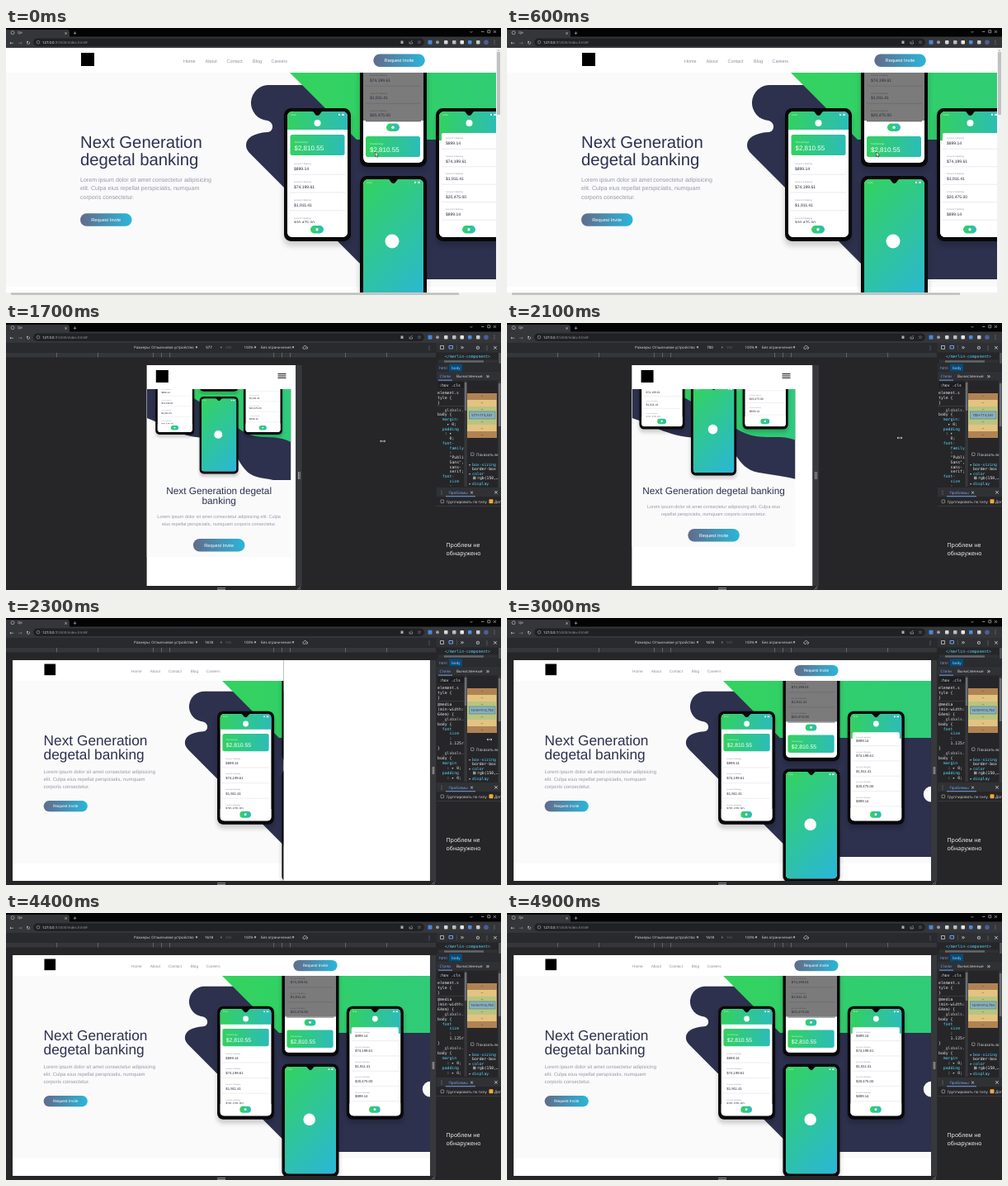
An HTML page for the animation above (5 s loop, 600x323 px).

```html
<!DOCTYPE html>
<html lang="en">
<head>
<meta charset="utf-8">
<title>Banking page</title>
<style>
html, body { margin: 0; width: 100%; height: 100%; overflow: hidden; background: #202124; }
#stage { display: block; width: 100%; height: 100%; }
text { font-family: "Liberation Sans", Arial, sans-serif; text-rendering: geometricPrecision; white-space: pre; }
.ui { font-family: "Open Sans", "Noto Sans", sans-serif; }
.mono { font-family: "DejaVu Sans Mono", monospace; }
.sym { font-family: "DejaVu Sans", sans-serif; text-anchor: middle; }
.mid { text-anchor: middle; }
</style>
</head>
<body>
<svg id="stage" viewBox="0 0 600 323">
  <defs>
    <linearGradient id="brand" gradientUnits="userSpaceOnUse" x1="-16" y1="24" x2="97" y2="136"><stop stop-color="#33d35e"/><stop offset="1" stop-color="#2ab6d9"/></linearGradient>
    <linearGradient id="head"><stop stop-color="#33d160"/><stop offset="1" stop-color="#2cbcb8"/></linearGradient>
    <linearGradient id="btn"><stop stop-color="#626b8b"/><stop offset="1" stop-color="#2ab6d9"/></linearGradient>
    <linearGradient id="wedge"><stop stop-color="#33d35e"/><stop offset="1" stop-color="#2fca7c"/></linearGradient>
    <clipPath id="screen"><rect x="4" y="4" width="73" height="152" rx="6"/></clipPath>
    <filter id="soft" x="-30%" y="-20%" width="160%" height="140%"><feGaussianBlur stdDeviation="3"/></filter>
  </defs>
  <g id="view"></g>
</svg>
<script>
const NAVY = '#2d314e', DARK = '#262628', LOOP = 5000, PX = 0.3127;
const view = document.getElementById('view');

const rect = (x, y, w, h, fill, r = 0, more = '') =>
  `<rect x="${x}" y="${y}" width="${w}" height="${h}" fill="${fill}" rx="${r}" ${more}/>`;
const text = (x, y, size, s, fill, cls = '') =>
  `<text x="${x}" y="${y}" font-size="${size}" fill="${fill}" class="${cls}">${s.replace(/</g, '&lt;')}</text>`;
const dot = (x, y, r, fill, more = '') => `<circle cx="${x}" cy="${y}" r="${r}" fill="${fill}" ${more}/>`;
const path = (d, fill, stroke = 'none', w = 0.7) =>
  `<path d="${d}" fill="${fill}" stroke="${stroke}" stroke-width="${w}"/>`;
const clip = (x, y, w, h, body) =>
  `<svg x="${x}" y="${y}" width="${w}" height="${h}" viewBox="${x} ${y} ${w} ${h}">${body}</svg>`;
const button = (x, y) => rect(x, y, 62.5, 15.5, 'url(#btn)', 7.8) +
  text(x + 31.2, y + 9.7, 5.6, 'Request Invite', '#fff', 'mid');

// Value at time t along [time, value] keys
function at(t, keys) {
  for (let i = 1; i < keys.length; i++) {
    const [t0, a] = keys[i - 1], [t1, b] = keys[i];
    if (t < t1) return a + (b - a) * Math.max(0, (t - t0) / (t1 - t0));
  }
  return keys[keys.length - 1][1];
}

// Phones
const rows = (list, y, step, line = '#eeeff2', small = '#8b8d99') => list.map(([n, sum], i) => {
  const b = y + i * step;
  return text(12, b - 6.6, 2.5, `Account ${n} Banking`, small) +
    text(12, b, 5, sum, '#26283c') + rect(7, b + 4.6, 67, 1.3, line);
}).join('');
const card = (x, y) => rect(x, y, 66, 25, 'url(#head)', 2.5) +
  text(x + 5, y + 10, 2.6, 'Total Earnings', '#e8fff4') + text(x + 5, y + 19, 8, '$2,810.55', '#fff');
const pill = y => rect(32, y, 16, 9.5, 'url(#head)', 4.7) + dot(40, y + 4.7, 1.7, '#fff');
const status = () => text(8, 9, 2.6, '12:30', '#fff') + rect(66, 6.8, 2, 2, '#fff') + rect(70, 6.8, 3, 2, '#fff');
const phone = (x, y, body) => `<g transform="translate(${x} ${y})">` +
  rect(-1, 5, 83, 162, '#000', 9, 'opacity=".16" filter="url(#soft)"') +
  rect(0, 0, 81, 161, '#08080a', 8.5) +
  `<g clip-path="url(#screen)">${rect(4, 4, 73, 152, '#fff')}${body}</g>` +
  path('M32 3.5q4 0 5 3q3.5 5 7 0q1-3 5-3z', '#08080a') + '</g>';

const sums = [[1, '$899.14'], [2, '$74,199.61'], [3, '$1,911.41'], [4, '$20,475.00'], [5, '$899.14']];
const phones =
  phone(337, 97, rect(4, 4, 73, 22, 'url(#head)') + status() + dot(40.5, 18, 4, '#fff') + card(7.5, 32) +
    rows(sums.slice(0, 4), 75, 21.8) + rect(4, 139, 73, 17, '#fff') + pill(142)) +
  phone(429, 7, rect(4, 4, 73, 101, '#7b7b7b') + rows(sums.slice(1, 4), 58, 21.2, '#707070', '#4c4c52') +
    pill(108.5) + card(7, 124)) +
  phone(521, 97, rect(4, 4, 73, 35, 'url(#head)') + status() + dot(40.5, 18, 4, '#fff') +
    rect(7, 30, 67, 30, '#fff', 2) + rows(sums, 44, 21.5) + rect(4, 138, 73, 18, '#fff') + pill(142)) +
  phone(429, 179, rect(4, 4, 73, 152, 'url(#brand)') + status() + dot(39, 79, 8.5, '#fff'));

// Wide layout of the page
const wide =
  rect(0, 24, 700, 330, '#fff') + rect(0, 54, 700, 259, '#fafafb') +
  path('M375 69H320a21.5 21.5 0 0 0-3 43c8 2 8 13 0 14C300 127 291 133 291 142q0 5 5 10L448 304H680V69Z', NAVY) +
  path('M344 54H680V135H425Z', 'url(#wedge)') + dot(640, 215, 11, '#fafafb') + phones +
  rect(0, 24, 700, 30, '#fff') + rect(91, 30, 16, 16, '#000') +
  [[215, 'Home'], [241.5, 'About'], [267.5, 'Contact'], [299, 'Blog'], [321.5, 'Careers']]
    .map(([x, s]) => text(x, 41.7, 5.5, s, '#8d8f9b')).join('') +
  button(445.3, 31.6) +
  text(90, 145.2, 20.3, 'Next Generation', NAVY) + text(90, 166, 20.3, 'degetal banking', NAVY) +
  ['Lorem ipsum dolor sit amet consectetur adipisicing', 'elit. Culpa eius repellat perspiciatis, numquam',
   'corporis consectetur.'].map((s, i) => text(90, 185.7 + i * 10.5, 7.08, s, '#9698a6')).join('') +
  button(90, 224.2);

// Narrow layout: left edge l, width w
function narrow(l, w) {
  const cx = l + w / 2, r = l + w, grow = w - 169, s = 0.556 + grow * 0.0043;
  const one = w > 180, up = one ? 12 : 0, rise = grow / 4;
  const title = one ? ['Next Generation degetal banking'] : ['Next Generation degetal', 'banking'];
  const body = one
    ? ['Lorem ipsum dolor sit amet consectetur adipisicing elit. Culpa eius', 'repellat perspiciatis, numquam corporis consectetur.']
    : ['Lorem ipsum dolor sit amet consectetur adipisicing elit. Culpa', 'eius repellat perspiciatis, numquam corporis consectetur.'];
  const p = (u, y) => `${l + u * w} ${y} `;
  const wave = 'M' + p(0, 80) + 'L' + p(0, 115) + 'C' + p(0.12, 122) + p(0.2, 137) + p(0.4, 139) +
    'C' + p(0.66, 142 - rise) + p(0.6, 181 - rise) + p(0.77, 188 - rise) +
    'C' + p(0.85, 191 - rise) + p(0.95, 193 - rise) + p(1, 196 - rise) + 'V80Z';
  const leaf = 'M' + p(0.225, 80) + 'L' + p(1, 80) + 'L' + p(1, 145 - rise / 2) +
    'C' + p(0.9, 134) + p(0.8, 142) + p(0.7, 134) + 'S' + p(0.6, 118) + p(0.5, 110) + 'Z';
  const hero = path(wave, NAVY) + path(leaf, 'url(#wedge)') +
    `<g transform="translate(${cx - 469.5 * s} ${-7 - grow * 1.38}) scale(${s})">${phones}</g>`;
  return rect(l, 51, w, 267, '#fff') + rect(l, 80, w, 203 - up, '#fafafb') +
    clip(l, 80, w, 110, hero) + rect(l + 11, 57, 15, 15, '#000') +
    [61, 63.4, 65.8].map(y => rect(r - 16, y, 10, 1.1, '#222')).join('') +
    title.map((t, i) => text(cx, 206.7 + i * 12, 11.8, t, NAVY, 'mid')).join('') +
    body.map((t, i) => text(cx, 236.2 - up + i * 8.6, 5.5, t, '#9698a6', 'mid')).join('') +
    button(cx - 31.2, 261 - up);
}

// Browser frame
const icon = (x, y, s, size = 6, fill = '#dcdee1') => text(x, y, size, s, fill, 'sym');
const browser =
  rect(0, 0, 600, 24, '#040405') + path('M0 11V2H74q3 0 3 3V11Z', '#35363a') + rect(0, 10.5, 600, 13.5, '#35363a') +
  dot(8, 5.7, 2, 'none', 'stroke="#b8babd" stroke-width=".7"') + text(14, 7.3, 4.3, 'Qe', '#e2e3e5', 'ui') +
  icon(72.5, 7.5, '×', 5) + icon(83.5, 8, '+', 6) +
  path('M562.5 4l1.5 1.5l1.5-1.5M576 4.5h3.5M583.8 2.8h3v3h-3zM591 3l3 3m0-3l-3 3', 'none', '#d5d6d8', 0.6) +
  icon(7, 19.5, '←') + icon(17, 19.5, '→', 6, '#85878b') + icon(27, 19.5, '↻') +
  rect(33, 12.5, 474, 9.5, '#202124', 4.7) + dot(39, 17.2, 1.8, 'none', 'stroke="#a7a9ad" stroke-width=".6"') +
  '<text x="44" y="18.8" font-size="4.3" fill="#fff" class="ui">127.0.0.1<tspan fill="#979a9f">:5500/index.html#</tspan></text>' +
  rect(478.5, 15.5, 3, 3.5, '#a7a9ad') + path('M489 16.5v2.5h3.5v-2M490 17.5l2.5-2.5', 'none', '#a7a9ad') + icon(501, 19.3, '☆', 6) +
  rect(511.5, 14.8, 5, 5, '#4a86d8', 0.8) + dot(523, 17.3, 2, '#97999d') + rect(531, 15, 4.5, 4.5, '#d5d6d8', 1) +
  rect(541, 15, 4.5, 4.5, '#b9bbbe', 1) + rect(550.5, 15, 4.5, 4.5, '#e8e8e8', 1) +
  rect(560, 15, 4.5, 4.5, '#4c8be0', 1) + rect(570, 15, 4.5, 4.5, '#c8cacd', 1) +
  dot(582, 17.2, 2.8, '#4a5f96') + icon(592, 19.4, '⋮');

const arrow = (x, y) => path(`M${x} ${y}v5.5l1.3-1.2l1 2.2l1-.5l-1-2h1.7Z`, '#fff', '#111', 0.5);
const resize = (x, y) => path(`M${x - 3} ${y}h6M${x - 1.8} ${y - 1.2}l-1.2 1.2l1.2 1.2M${x + 1.8} ${y - 1.2}l1.2 1.2l-1.2 1.2`, 'none', '#eee', 0.7);

const fullWindow = clip(0, 24, 594, 296, wide) +
  rect(594, 24, 6, 299, '#f1f1f1') + rect(595, 29, 4, 76, '#c1c1c1') + icon(597, 27.5, '▴', 3, '#777') +
  rect(0, 320, 594, 3, '#f1f1f1') + rect(6, 320.5, 543, 2.2, '#b9b9b9') + arrow(447.5, 150);

// Developer tools
const GREY = '#dcdee1', BLUE = '#7cacf8', CYAN = '#5cd5fb';
const mono = (x, y, s, fill = '#eceef0') => text(x, y, 4.8, s, fill, 'mono');
const lines = (list, y, step) => list.map((s, i) => {
  const [, pad, word] = s.match(/^( *)(.*)$/);
  const fill = word[0] === '_' ? '#b4b6ba' : /^(margin|padding|font|family|size)/.test(word) ? CYAN : '#e3e4e7';
  return mono(523 + pad.length * 2.9, y + i * step, word, fill);
}).join('');
const ruleTop = ['element.s', 'tyle {', '}'];
const narrowRules = ['  _globals.', 'body {', '  margin:', '    ▸ 0;', '  padding', '   : ▸', '     0;', '  font-', '     family', '     :', '     "Publi', '     Sans",', '     sans-', '     serif;', '  font-', '     size', '     :'];
const wideRules = ['@media', '(min-width:', '64em) {', '  _globals.', 'body {', '  font', '     size', '     :', '     1.125r', '}', '  _globals.', 'body {', '  margin', '    : ▸ 0;', '  padding', '    : ▸ 0;'];

function panel(w, big) {
  const box = big ? `${w}×914,750` : `${w}×715,531`;
  return rect(521.5, 24, 78.5, 299, DARK) + rect(521.5, 24, 78.5, 11.5, '#2f3034') +
    path('M526.5 27.5h4v4h-4z', 'none', GREY) + path('M537 27.5h4.5v3.5h-4.5z', 'none', BLUE, 0.9) + rect(546, 26.5, 0.6, 6, '#55575b') +
    icon(553, 31.7, '»', 8) + icon(572, 31.7, '⚙') + icon(583, 31.7, '⋮') + icon(593, 31.7, '×', 7) +
    clip(522, 36, 75, 8, mono(532, 41.7, '</merlin-component>', CYAN)) +
    rect(524, 44.5, 72, 4, '#303135') + rect(531, 45.3, 48, 2.4, '#66686c') + rect(597, 36, 3, 13, '#515357') +
    rect(522, 49, 78, 9.5, '#2b2c30') + rect(537, 49.5, 16, 9, '#064b78') +
    text(525, 55.5, 4.5, 'html', BLUE, 'ui') + text(540, 55.5, 4.5, 'body', '#b9dcff', 'ui') +
    rect(522, 59, 78, 10.5, '#303135') + text(525.5, 66, 4.6, 'Стили', BLUE, 'ui') + text(546, 66, 4.6, 'Вычисленные', GREY, 'ui') +
    icon(584, 66.7, '»', 8) + rect(524, 68.7, 17, 0.9, BLUE) +
    rect(524, 71.5, 32, 7, '#1c1d20') + mono(525, 76.6, ':hov .cls') +
    clip(522, 79, 33.5, 119, lines(ruleTop, 85.5, 6) + rect(522, 100, 36, 0.5, '#4a4c50') +
      (big ? lines(wideRules, 106, 5.9) : lines(narrowRules, 106.5, 5.75))) +
    rect(555.5, 70, 3.2, 128, '#37383c') + rect(555.8, 72, 2.6, 34, '#6d6f73') +
    rect(559, 85, 36, 54, '#b08354') + rect(559, 93, 35.5, 38, '#e3c381') + rect(559, 101, 35, 22, '#b8c47f') +
    rect(561.5, 107, 31.5, 9, '#88b1bd', 0, 'stroke="#4b7584" stroke-width=".6"') + text(577, 113.3, 4.3, box, '#25282c', 'ui mid') +
    [90, 98, 105.5, 121, 128.5, 136.5].map(y => text(577, y, 4.5, '–', '#333', 'mid')).join('') +
    rect(563.5, 157, 3.5, 3.5, 'none', 0.5, 'stroke="#b9bbbe" stroke-width=".6"') + text(570, 160.8, 4.7, 'Показать все', GREY, 'ui') +
    clip(559, 164, 37.5, 35, mono(561, 173, '▸', GREY) + mono(565, 173, 'box-sizing', CYAN) + mono(565, 178, 'border-box') +
      mono(561, 184, '▸', GREY) + mono(565, 184, 'color', CYAN) + rect(566, 185.7, 3.5, 3.5, '#969696') + mono(571, 189.2, 'rgb(150,…') +
      mono(561, 195.7, '▸', GREY) + mono(565, 195.7, 'display', CYAN)) +
    rect(596.5, 70, 3.5, 129, '#37383c') + rect(596.8, 73, 2.8, 52, '#6d6f73') +
    rect(522, 199, 78, 11, '#303135') + icon(528, 207, '⋮') + text(536.5, 206.5, 4.5, 'Проблемы', BLUE, 'ui') +
    icon(564.5, 206.8, '×', 6) + icon(594, 207.2, '×', 7) + rect(533, 209.3, 36, 0.9, BLUE) +
    rect(527, 214, 3.7, 3.7, 'none', 0.5, 'stroke="#b9bbbe" stroke-width=".6"') + text(534, 217.7, 4.5, 'Группировать по типу', GREY, 'ui') +
    rect(585.5, 213.2, 5, 5, '#f2a83b', 0.8) + text(592, 217.7, 4.7, 'Доп', GREY, 'ui') + rect(522, 221.5, 78, 0.5, '#4a4c50') +
    text(533.5, 271, 7, 'Проблем не', '#fff', 'ui') + text(533.5, 280.5, 7, 'обнаружено', '#fff', 'ui');
}

function tools(t) {
  const size = time => at(time, [[1500, 540], [2000, 633], [2100, 700], [2200, 1050], [2300, 1618]]);
  const w = Math.round(size(t)), inner = size(t - 100), big = inner >= 1024;
  const full = w * PX, l = 261 - full / 2, r = l + full, cw = inner * PX;
  const label = (x, s, fill = GREY) => text(x, 31.3, 4.4, s, fill, 'ui');
  const ticks = [-200, -150, -83, -73, -63, 63, 73, 83, 150, 200];
  const page = big
    ? clip(l, 51, cw, 267, `<g transform="translate(${l - 39.1} 30) scale(.852)">${wide}</g>`)
    : narrow(l, cw);
  const cursor = t < 1500 ? arrow(447.5, 144.5)
    : t < 2400 ? resize(at(t, [[1500, 447], [2100, 476], [2300, 586]]), at(t, [[1500, 145], [2100, 139], [2300, 147]]))
    : t >= 3300 && t < 4300 ? resize(586, 147) : '';
  return rect(0, 24, 522, 299, DARK) + rect(0, 24, 521, 11.5, '#292a2d') +
    label(155, 'Размеры: Отзывчивое устройство') + icon(231, 31.2, '▾', 5) +
    text(246, 31.3, 4.4, String(w), '#fff', 'ui mid') + label(259.5, '×') + label(266, '960', '#5c5e62') +
    label(288.5, '100%') + icon(302, 31.2, '▾', 5) + label(309, 'Без ограничения') + icon(348, 31.2, '▾', 5) +
    path('M359.5 30l3-3l2 2l-3 3zM364 32q2-1 1.5-3', 'none', GREY) + icon(513, 31.5, '⋮') +
    rect(0, 36, 521, 5.5, '#35363a') + ticks.map(x => rect(261 + x, 36, 0.7, 5.5, '#77797d')).join('') +
    rect(l, 51, full, 267, '#fff') + page +
    rect(r, 51, 7.5, 267, t < 1500 ? DARK : '#37383c') +
    rect(r + 2.8, 180, 0.7, 9, '#c5c7ca') + rect(r + 4.5, 180, 0.7, 9, '#c5c7ca') +
    rect(256, 320.4, 10, 0.7, '#c5c7ca') + rect(256, 322, 10, 0.7, '#c5c7ca') +
    path(`M${r + 2} 322.5l4-4m-1.5 4l1.5-1.5`, 'none', '#c5c7ca', 0.6) +
    panel(w, big) + cursor;
}

let last = -1;
function draw(now) {
  const t = Math.floor(now / 100) * 100 % LOOP;
  if (t !== last) {
    last = t;
    view.innerHTML = (t < 800 ? fullWindow : tools(t)) + browser;
  }
  requestAnimationFrame(draw);
}
draw(0);
</script>
</body>
</html>
```
